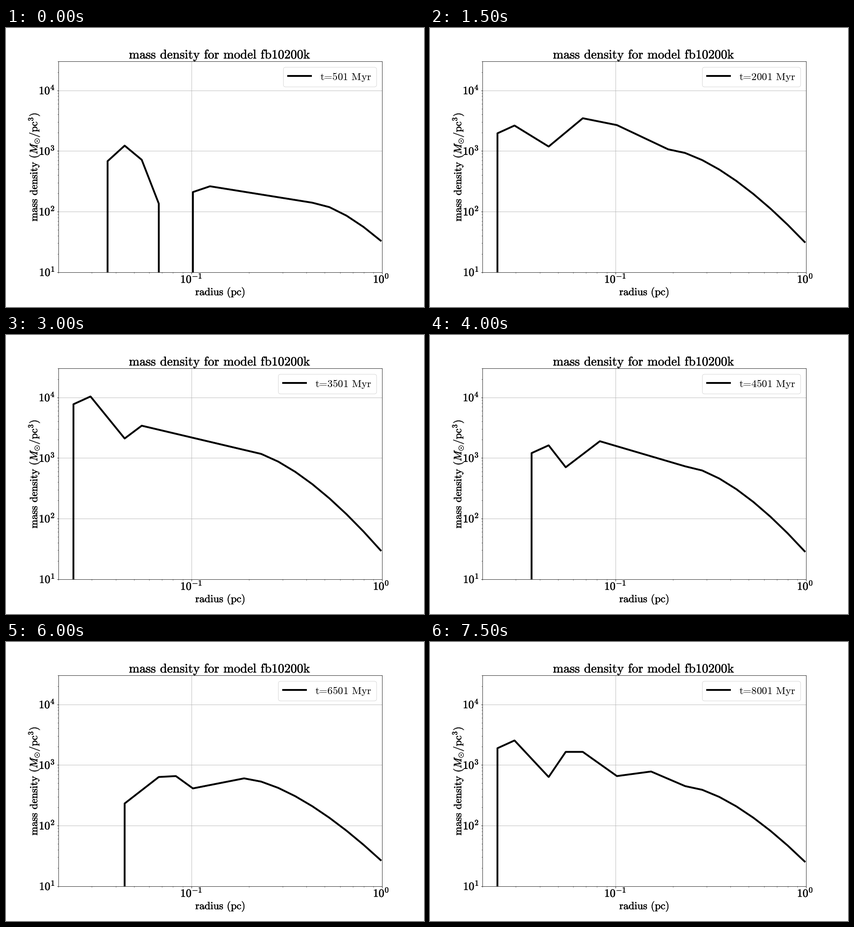
Write a matplotlib script that moves like this. It is 917 px wide and 611 px high and loops after 8000 ms.

```python
import matplotlib.pyplot as plt
import numpy as np
from matplotlib.animation import FuncAnimation
from matplotlib.patches import FancyBboxPatch
from matplotlib.patheffects import withStroke

W, H, DPI = 917, 611, 72
FRAMES, STEP_MS = 16, 500
DECADE = 132.67               # pixels per decade of density
BINS = np.arange(-1, 19)      # bin -1 lies just left of the axes
LAST = BINS[-1]
RISE, BEND = 35, 1.55         # inward rise per bin, curvature of the tail

plt.rcParams["mathtext.fontset"] = "cm"

# Turning points (bin, pixels above the floor); the tail starts at the last one
TURNS = {
    0: [(2, 243), (3, 277), (4, 246), (5, 150), (8, 188), (14, 152)],
    3: [(0, 304), (1, 321), (3, 275), (5, 337), (7, 322), (10, 269)],
    6: [(0, 383), (1, 400), (3, 308), (4, 336), (10, 283)],
    8: [(2, 276), (3, 293), (4, 245), (6, 302), (11, 247)],
    10: [(3, 177), (4, 271), (5, 287), (7, 275), (9, 280)],
    12: [(3, 181), (5, 239), (6, 241), (7, 214), (10, 236)],
    15: [(0, 302), (1, 319), (3, 239), (4, 294), (5, 294), (7, 241),
         (9, 251), (11, 219)],
}
# Innermost filled bin at each step
INNER = (2, -1, 2, 0, 2, 2, 0, -1, 2, 2, 3, 1, 3, 1, 2, 0)


def profile(step):
    """Straight runs between turning points, then a power-law tail."""
    b, h = zip(*TURNS[step])
    y = np.interp(BINS, (-1, *b), (h[0] + RISE * (b[0] + 1), *h))
    u = np.clip((BINS - b[-1]) / (LAST - b[-1]), 0, 1)
    return y - (h[-1] - (69 - step)) * u ** BEND


shapes = np.array([profile(s) for s in TURNS])


def density(step):
    height = np.array([np.interp(step, list(TURNS), col) for col in shapes.T])
    rho = 10 ** (1 + height / DECADE)
    rho[BINS < INNER[step]] = 0
    if step == 0:
        rho[BINS == 6] = 0
    return rho


fig = plt.figure(figsize=(W / DPI, H / DPI), dpi=DPI, facecolor="white")
ax = fig.add_axes([0.125, 0.125, 0.775, 0.755])
ax.set_xscale("log")
ax.set_yscale("log")
ax.grid(True, color="#b0b0b0", lw=0.8)
ax.set_axisbelow(True)
ax.tick_params(which="both", labelleft=False, labelbottom=False)
radius = 10 ** (-1.6192 + 0.0895 * BINS)
curve, = ax.plot(radius, density(0), color="black", lw=4)
ax.set_xlim(0.02, 1)
ax.set_ylim(10, 3e4)

# Pixel-space layer for the lettering and the legend
page = fig.add_axes([0, 0, 1, 1])
page.axis("off")
page.set_xlim(0, W)
page.set_ylim(H, 0)
heavy = [withStroke(linewidth=0.5, foreground="black")]


def put(x, y, text, size=23, ha="center", **kw):
    return page.text(x, y, f"${text}$", size=size, ha=ha, va="baseline", **kw)


def put_power(x, y, n, ha="center"):
    put(x, y, rf"\mathrm{{10}}^{{\mathrm{{{n}}}}}", 24.5, ha,
        path_effects=heavy)


put(469, 67, r"\text{mass density for model fb10200k}", 27.8,
    path_effects=heavy)
put(470, 585, r"\text{radius (pc)}", path_effects=heavy)
put(68.5, 304.5,
    r"\text{mass density (}M_{\odot}/\mathrm{pc}^{\mathrm{3}}\mathrm{)}",
    23.3, rotation=90, rotation_mode="anchor", path_effects=heavy)
for n in range(1, 5):
    put_power(107.5, 543 - DECADE * (n - 1), n, "right")
put_power(406.5, 558, -1)
put_power(823, 558, 0)

frame = FancyBboxPatch((608, 86), 205, 43, fc="white", ec="0.8", lw=1,
                       alpha=0.8, boxstyle="round,pad=0,rounding_size=5")
page.add_patch(frame)
handle, = page.plot([618, 668], [105, 105], color="black", lw=4)
label = put(802, 113.5, r"\text{t=501 Myr}", ha="right")


def draw(i):
    myr = 501 + 500 * i
    left = 608.5 if myr < 1000 else 597.5
    curve.set_ydata(density(i))
    frame.set_bounds(left, 86, 813 - left, 43)
    handle.set_xdata([left + 10, left + 60])
    label.set_text(rf"$\text{{t={myr} Myr}}$")
    return curve, frame, handle, label


anim = FuncAnimation(fig, draw, frames=FRAMES, interval=STEP_MS, repeat=True)
plt.show()
```
